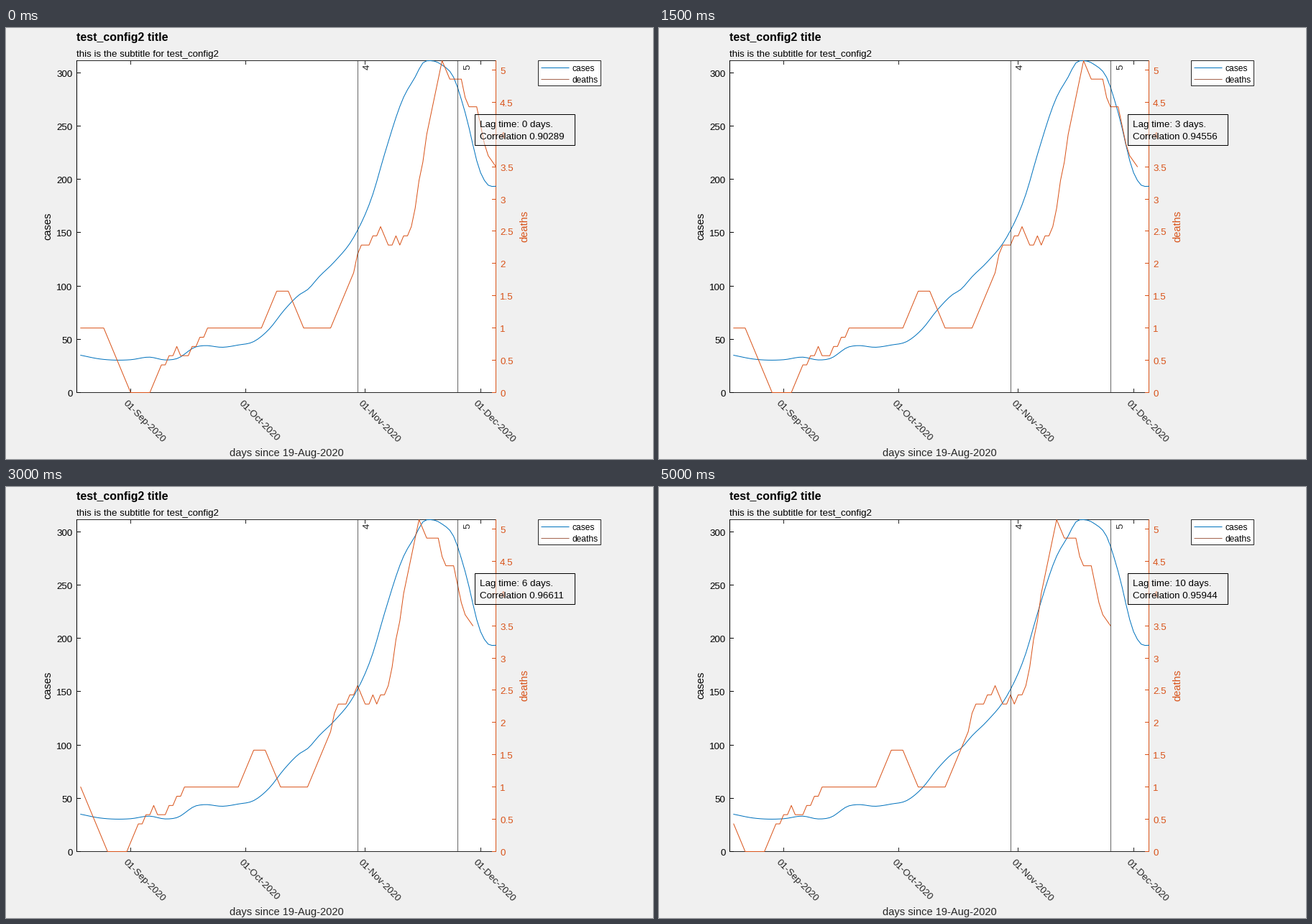
These frames come from a looping animation (900 px wide and 600 px high, 5500 ms). A matplotlib script:

```python
import numpy as np
import matplotlib.pyplot as plt
from matplotlib.animation import FuncAnimation
from matplotlib.patches import Rectangle

plt.rcParams["font.family"] = ["Liberation Sans", "DejaVu Sans"]

W, H, DPI = 900, 600, 100
PX = 72 / DPI
LEFT, RIGHT, TOP, BOTTOM = 98.5, 681.5, 45.5, 507.5
DAYS, LAGS = 109, 11
CASES_MAX, DEATHS_MAX = 311.3, 36 / 7
BLUE, ORANGE, DARK, BLACK = "#0072BD", "#D95319", "#262626", "#000000"

# (day, weekly mean), joined by a smooth curve
CASES = [(1, 35), (6, 31.5), (14, 30.8), (19, 33.2), (23, 30.6), (26, 31.8),
         (31, 42.9), (33, 44), (38, 42.5), (42, 44.6), (46, 47.8), (50, 59.4),
         (54, 77.6), (58, 92.1), (60, 96.5), (63, 108.6), (67, 122.7),
         (72, 145.6), (77, 186.1), (80, 223.2), (85, 277.1), (88, 296),
         (90, 309.2), (92, 311.3), (95, 307.2), (98, 295.7), (101, 262.6),
         (105, 206.3), (107, 194.5), (109, 193.5)]

# (day, weekly sum), joined by straight lines and rounded to whole deaths
DEATHS = [(1, 7), (7, 7), (14, 0), (19, 0), (22, 3), (26, 4.6), (27, 4),
          (29, 4), (34, 7), (48, 7), (52, 11), (55, 11), (59, 7), (66, 7),
          (72, 13), (73, 15.2), (79, 17.7), (81, 16), (83, 17), (84, 16),
          (87, 17.8), (93, 32.4), (95, 36.4), (97, 34), (100, 34), (102, 31),
          (104, 31), (106, 27)]

# (lag, correlation), joined by a smooth curve
CORRELATION = [(0, 0.90289), (2, 0.93341), (4, 0.95528), (5, 0.96219),
               (7, 0.96749), (9, 0.96378), (10, 0.95944)]


def smooth(keys, x):
    """Cubic Hermite curve through the key points."""
    xs, ys = np.array(keys, float).T
    slope = np.gradient(ys, xs)
    i = np.clip(np.searchsorted(xs, x, "right") - 1, 0, len(xs) - 2)
    h = xs[i + 1] - xs[i]
    t = (x - xs[i]) / h
    ease = t * t * (3 - 2 * t)
    return (ys[i] + (ys[i + 1] - ys[i]) * ease
            + h * t * (1 - t) * (slope[i] * (1 - t) - slope[i + 1] * t))


day = np.arange(1, DAYS + 1)
cases = smooth(CASES, day)
deaths = np.round(np.interp(day, *zip(*DEATHS))) / 7
deaths[-3:] = np.linspace(3.67, 3.5, 3)  # the averaging window shrinks here
correlation = smooth(CORRELATION, np.arange(LAGS))


def day_x(d):
    return LEFT + d * (RIGHT - LEFT) / DAYS


def value_y(v, top):
    return BOTTOM - v * (BOTTOM - TOP) / top


def crisp(v):
    return np.floor(v) + 0.5


fig = plt.figure(figsize=(W / DPI, H / DPI), dpi=DPI, facecolor="#F0F0F0")
ax = fig.add_axes([0, 0, 1, 1])
ax.set_xlim(0, W)
ax.set_ylim(H, 0)
ax.axis("off")


def line(xs, ys, color, z=2, **kw):
    return ax.plot(xs, ys, color=color, lw=PX, zorder=z, snap=False,
                   solid_capstyle="projecting", solid_joinstyle="round",
                   **kw)[0]


def label(x, y, s, size=13.333, color=DARK, z=3, **kw):
    return ax.text(x, y, s, fontsize=size * PX, color=color, zorder=z,
                   va="baseline", rotation_mode="anchor", **kw)


def box(x0, y0, x1, y1, z, **kw):
    ax.add_patch(Rectangle((x0, y0), x1 - x0, y1 - y0, lw=PX, zorder=z,
                           snap=False, **kw))


# axes
box(LEFT, TOP, RIGHT, BOTTOM, 0, fc="white", ec=DARK)
line([LEFT, LEFT], [TOP, BOTTOM], BLACK)
line([RIGHT, RIGHT], [TOP, BOTTOM], ORANGE)

for d, month in [(14, "Sep"), (44, "Oct"), (75, "Nov"), (105, "Dec")]:
    x = day_x(d)
    for y, step in [(BOTTOM, -5), (TOP, 5)]:
        line([crisp(x)] * 2, [y, y + step], DARK)
    label(x - 10.5, 523, f"01-{month}-2020", rotation=-45)

for v in range(0, 301, 50):
    y = value_y(v, CASES_MAX)
    line([LEFT, LEFT + 5], [crisp(y)] * 2, BLACK)
    label(92.5, y + 5.5, str(v), color=BLACK, ha="right")

for v in np.arange(0, 5.1, 0.5):
    y = value_y(v, DEATHS_MAX)
    line([RIGHT - 5, RIGHT], [crisp(y)] * 2, ORANGE)
    label(687, y + 5.5, f"{v:g}", color=ORANGE)

# titles and axis labels
label(98, 18, "test_config2 title", 16, BLACK, weight="bold")
label(98, 40, "this is the subtitle for test_config2", color=BLACK)
label(390, 596, "days since 19-Aug-2020", 14.667, ha="center")
label(62, 276, "cases", 14.667, BLACK, rotation=90, ha="center")
label(725, 276, "deaths", 14.667, ORANGE, rotation=90, ha="center")

# curves and marked days
line(day_x(day), value_y(cases, CASES_MAX), BLUE, 2.2)
death_line = line([], [], ORANGE, 2.3)
for x, name in [(489.5, "4"), (628.5, "5")]:
    line([x, x], [TOP, BOTTOM], DARK, 2.4, alpha=0.7)
    label(x + 16.5, 58.5, name, rotation=90)

# legend
box(740.5, 45.5, 827.5, 80.5, 3, fc="white", ec=DARK)
for y, name, color in [(55.5, "cases", BLUE), (71.5, "deaths", "#A5654F")]:
    line([745, 783], [y, y], color, 4)
    label(787, y + 4.5, name, 12, BLACK, 4)

# note
box(652.5, 120.5, 791.5, 163.5, 5, fc=(0.94, 0.94, 0.94, 0.5), ec=BLACK)
lag_text = label(659, 138, "", color=BLACK, z=6)
corr_text = label(659, 155, "", color=BLACK, z=6)


def update(lag):
    shifted = deaths[lag:]
    death_line.set_data(day_x(day[:len(shifted)]), value_y(shifted, DEATHS_MAX))
    lag_text.set_text(f"Lag time: {lag} days.")
    corr_text.set_text(f"Correlation {correlation[lag]:.5f}")
    return death_line, lag_text, corr_text


anim = FuncAnimation(fig, update, frames=LAGS, interval=500,
                     repeat=True, repeat_delay=0, blit=False)
plt.show()
```
